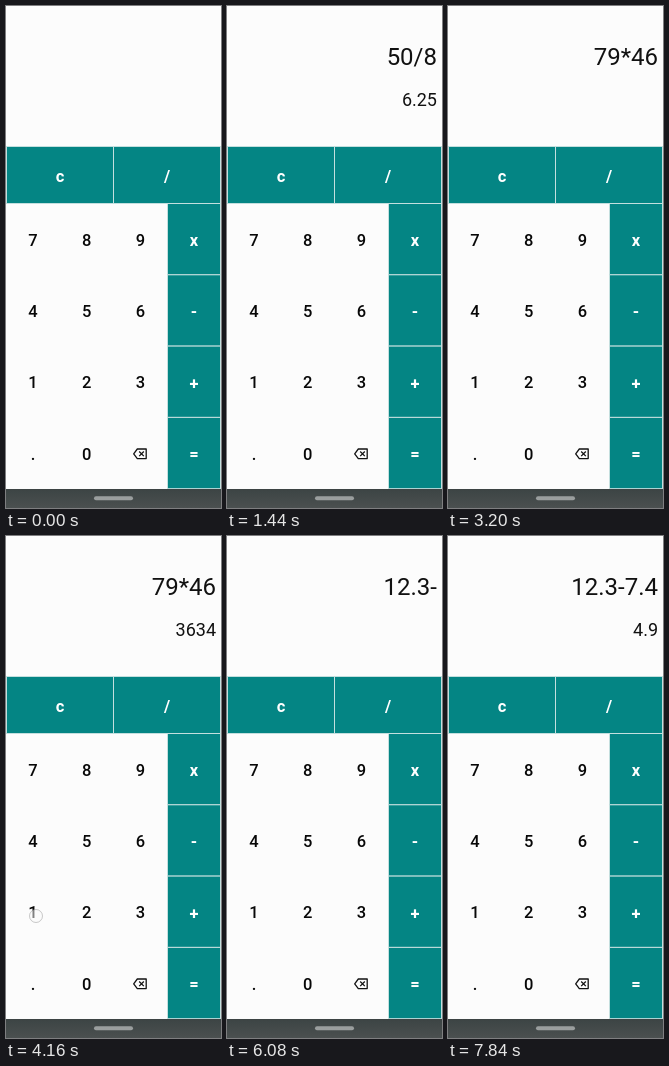
Recreate the animation shown at these times as an HTML page. Size 215 by 502 pixels, loop 8 s.

```html
<!DOCTYPE html>
<html lang="en">
<head>
<meta charset="utf-8">
<title>Calculator</title>
<style>
  html, body { margin: 0; width: 100%; height: 100%; overflow: hidden; background: #fcfcfc; }
  svg { display: block; width: 215px; height: 502px; font-family: Roboto, sans-serif; }
  .key { font-size: 16.5px; font-weight: 500; text-anchor: middle; fill: #080808; }
  .action { font-weight: 700; fill: #fff; }
  #entry, #result { text-anchor: end; fill: #111; }
  #entry { font-size: 24px; }
  #result { font-size: 18px; }
</style>
</head>
<body>
<svg viewBox="0 0 215 502">
  <defs>
    <linearGradient id="bar" x2="0" y2="1">
      <stop stop-color="#3c4444"/>
      <stop offset="1" stop-color="#4b5050"/>
    </linearGradient>
  </defs>
  <rect width="215" height="502" fill="#fcfcfc"/>
  <text id="entry" x="210" y="58.5"></text>
  <text id="result" x="210" y="100"></text>
  <g id="keys"></g>
  <g fill="none" stroke="#111" stroke-width="1.3" stroke-linejoin="round">
    <path d="M131.3 443H140.2V452.6H131.3L127.7 447.8Z"/>
    <path d="M133.2 445.5l4.6 4.6m0-4.6l-4.6 4.6"/>
  </g>
  <rect y="483" width="215" height="19" fill="url(#bar)"/>
  <rect x="88" y="490.3" width="39" height="4" rx="2" fill="#9a9e9e"/>
  <circle id="touch" r="6.5" stroke-width="1"/>
</svg>
<script>
const LOOP = 8000;
const $ = id => document.getElementById(id);
const keys = $('keys');

function add(name, attrs, text = '') {
  const node = document.createElementNS('http://www.w3.org/2000/svg', name);
  for (const key in attrs) node.setAttribute(key, attrs[key]);
  node.textContent = text;
  keys.append(node);
}

function actionKey(label, x, y, width, height, textY) {
  add('rect', { x, y, width, height, fill: '#048584', stroke: '#c4dfde', 'stroke-width': 1 });
  add('text', { x: x + width / 2, y: textY, class: 'key action' }, label);
}

actionKey('c', 0.5, 140.5, 107, 57, 176);
actionKey('/', 107.5, 140.5, 107, 57, 176);
['x', '-', '+', '='].forEach((label, row) =>
  actionKey(label, 161.5, 197.5 + row * 71.3, 53, 71.3, 240 + row * 71.3));
['789', '456', '123', '.0'].forEach((labels, row) =>
  [...labels].forEach((label, col) =>
    add('text', { x: 27 + col * 53.7, y: 239.8 + row * 71.3, class: 'key' }, label)));

// press time, release time, touch x, touch y, entry and result after release
const taps = [
  [160, 320, 84, 306, '5'],
  [480, 560, 84, 449, '50'],
  [800, 880, 165, 170, '50/'],
  [1120, 1200, 84, 235, '50/8'],
  [1280, 1440, 192, 450, '50/8', '6.25'],
  [1920, 2080, 30, 232, '7'],
  [2240, 2400, 138, 232, '79'],
  [2640, 2800, 194, 230, '79*'],
  [2880, 2960, 28, 301, '79*4'],
  [3040, 3200, 141, 303, '79*46'],
  [3360, 3520, 192, 456, '79*46', '3634'],
  [4160, 4320, 30, 380, '1'],
  [4400, 4480, 84, 378, '12'],
  [4640, 4800, 30, 447, '12.'],
  [5200, 5440, 138, 378, '12.3'],
  [6000, 6080, 192, 302, '12.3-'],
  [6400, 6480, 29, 232, '12.3-7'],
  [6640, 6800, 29, 447, '12.3-7.'],
  [7040, 7200, 29, 303, '12.3-7.4'],
  [7440, 7440, 192, 450, '12.3-7.4', '4.9']
];

function draw(t) {
  const done = taps.filter(tap => t >= tap[1]).pop() || [];
  $('entry').textContent = done[4] || '';
  $('result').textContent = done[5] || '';

  const held = taps.find(tap => t >= tap[0] && t < tap[1]);
  const touch = $('touch');
  touch.setAttribute('visibility', held ? 'visible' : 'hidden');
  if (!held) return;
  const [, , x, y] = held;
  const onTeal = x > 161 || y < 197;
  touch.setAttribute('cx', x);
  touch.setAttribute('cy', y);
  touch.setAttribute('fill', onTeal ? 'rgba(225,235,235,.65)' : 'rgba(250,250,250,.5)');
  touch.setAttribute('stroke', onTeal ? 'rgba(150,190,190,.7)' : 'rgba(150,150,150,.5)');
}

const start = performance.now();
function frame() {
  draw((performance.now() - start) % LOOP);
  requestAnimationFrame(frame);
}
frame();
</script>
</body>
</html>
```
